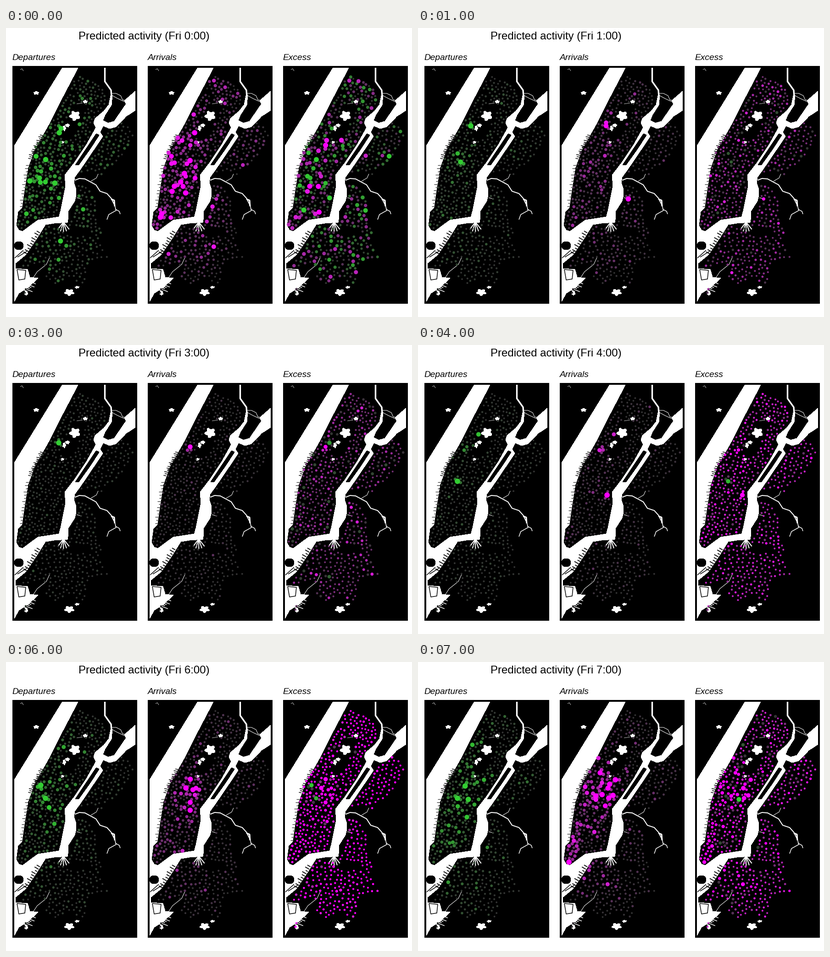
A matplotlib script for the animation above (8000 ms loop, 885 by 632 pixels).

```python
import numpy as np
import matplotlib.pyplot as plt
from matplotlib.animation import FuncAnimation
from matplotlib.path import Path

W, H, DPI = 885, 632, 100
PX = 72 / DPI
PANEL_STEP = 295
HOURS = 8
GREY = np.array([0.2, 0.2, 0.2])
GREEN = np.array([50, 205, 50]) / 255
MAGENTA = np.array([1.0, 0.0, 1.0])

fig = plt.figure(figsize=(W / DPI, H / DPI), dpi=DPI, facecolor="white")
ax = fig.add_axes([0, 0, 1, 1])
ax.set_xlim(0, W)
ax.set_ylim(H, 0)
ax.axis("off")

# ---------------------------------------------------------------- map

HARBOUR = [
    (123, 87), (157, 87), (124, 150), (92, 213), (62, 266), (48, 305),
    (41, 350), (35, 392), (26, 402), (22, 432), (28, 442), (36, 445),
    (56, 430), (70, 420), (116, 413), (136, 413), (134, 425), (105, 427),
    (86, 430), (66, 462), (44, 495), (21, 514), (21, 526), (47, 528),
    (52, 545), (70, 547), (47, 568), (28, 580), (18, 598), (18, 258)]
EAST_RIVER = [
    (228, 148), (224, 168), (213, 182), (194, 198), (191, 207), (196, 218),
    (176, 254), (148, 296), (128, 322), (130, 345), (119, 400), (115, 415),
    (136, 415), (136, 400), (150, 378), (153, 365), (152, 350), (148, 338),
    (150, 326), (163, 308), (186, 274), (211, 237), (205, 228), (212, 214),
    (226, 220), (240, 216), (262, 193), (282, 180), (282, 138), (258, 159),
    (262, 166), (236, 204), (222, 208), (211, 202), (216, 190), (230, 168),
    (232, 146)]
ISLAND = [(203, 234), (185, 262), (158, 300), (151, 300), (172, 268),
          (197, 231)]
# Ponds as x, y, half width, half height
PONDS = [(150, 192, 10, 9), (127, 219, 3, 5), (134, 213, 4, 3),
         (173, 161, 4, 3), (123, 250, 3, 2), (66, 142, 5, 3),
         (138, 578, 9, 6), (155, 567, 4, 2), (44, 580, 3, 4)]
# Streams as width followed by their bends
STREAMS = [
    (3.4, (215.5, 87), (215.5, 117), (229, 136), (230, 150)),
    (1, (231, 143), (240, 143), (250, 148), (254, 157), (266, 160)),
    (1, (232, 148), (243, 154), (258, 161)),
    (2, (150, 333), (160, 329), (172, 330), (196, 343), (205, 357),
     (220, 362), (229, 372), (237, 388)),
    (3, (229, 374), (236, 377), (237, 390)),
    (1.5, (237, 388), (240, 399), (224, 408), (220, 419)),
    (1.5, (238, 396), (247, 401), (249, 407)),
    (1, (185, 335), (197, 328), (201, 319)),
    (1, (154, 371), (165, 374)),
    (1, (60, 545), (68, 533), (88, 517), (95, 502)),
    (0.7, (154, 166), (167, 164)),
    (0.7, (31, 91), (35, 89), (38, 94))]


def stroke(points, width, color, dx):
    x, y = np.transpose(points)
    ax.plot(x + dx, y, color=color, lw=width * PX, solid_capstyle="butt",
            zorder=2)


def area(points, color, dx):
    x, y = np.transpose(points)
    ax.fill(x + dx, y, color=color, lw=0, antialiased=False, zorder=2)


def blob(x, y, rx, ry, color, dx, rough=0.0):
    turn = np.linspace(0, 2 * np.pi, 24)
    r = 1 + rough * np.sin(5 * turn + x)
    area(np.c_[x + rx * r * np.cos(turn), y + ry * r * np.sin(turn)],
         color, dx)


def piers(start, end, count, reach, width, color, dx):
    for i, t in enumerate(np.linspace(0, 1, count)):
        base = np.array(start) * (1 - t) + np.array(end) * t
        tip = base + np.array(reach) * (1 + 0.35 * np.sin(2.4 * i))
        stroke([base, tip], width, color, dx)


def draw_map(dx):
    area([(14, 83), (286, 83), (286, 603), (14, 603)], "black", dx)
    area(HARBOUR, "white", dx)
    area(EAST_RIVER, "white", dx)
    area(ISLAND, "black", dx)
    for pond in PONDS:
        blob(*pond, "white", dx, 0.25)
    for width, *bends in STREAMS:
        stroke(bends, width, "white", dx)
    piers((80, 235), (54, 286), 14, (-6, -1), 1.5, "black", dx)
    piers((49, 300), (36, 390), 14, (-6, 0), 1, "black", dx)
    piers((74, 448), (46, 494), 10, (-7, -4), 1.8, "black", dx)
    piers((48, 549), (36, 572), 8, (15, 6), 1.5, "white", dx)
    for a in np.radians(np.linspace(48, 130, 5)):
        stroke([(125, 424), (125 + 19 * np.cos(a), 424 + 22 * np.sin(a))],
               2, "white", dx)
    blob(28, 476, 10, 9, "black", dx)
    stroke([(25, 501), (46, 488)], 1.5, "black", dx)
    stroke([(19, 503), (38, 486)], 1.5, "black", dx)
    stroke([(24, 528), (43, 530), (41, 549), (28, 551), (24, 528)],
           1.5, "black", dx)


# ---------------------------------------------------------------- stations

MANHATTAN = [
    (160, 103), (205, 125), (220, 150), (221, 162), (186, 202), (184, 235),
    (152, 280), (124, 312), (124, 350), (110, 410), (62, 418), (36, 441),
    (26, 432), (25, 415), (41, 385), (46, 325), (60, 265), (96, 214),
    (143, 130), (152, 108)]
PARK = [(152, 156), (180, 170), (138, 250), (112, 238)]
QUEENS = [
    (252, 206), (266, 217), (277, 234), (258, 275), (208, 320), (175, 312),
    (160, 318), (190, 282), (222, 230)]
BROOKLYN = [
    (158, 345), (174, 347), (198, 375), (193, 410), (207, 445), (202, 470),
    (226, 508), (190, 505), (173, 520), (173, 561), (153, 561), (145, 540),
    (108, 561), (82, 540), (94, 520), (72, 516), (30, 522), (62, 484),
    (80, 445), (92, 432), (135, 442), (144, 408), (157, 378)]
YARD = [(122, 428), (185, 440), (180, 454), (126, 453)]


def fill_stations(rng, found, outline, gap, hole=None):
    outline = Path(outline)
    low, high = outline.vertices.min(0), outline.vertices.max(0)
    tries = rng.uniform(low, high, (7000, 2))
    keep = outline.contains_points(tries)
    if hole:
        keep &= ~Path(hole).contains_points(tries)
    for p in tries[keep]:
        if np.min(np.sum((np.array(found) - p) ** 2, axis=1)) > gap ** 2:
            found.append(p)


def place_stations():
    found = [(43, 571), (41, 579), (86, 298), (115, 214), (115, 207)]
    rng = np.random.default_rng(12)
    fill_stations(rng, found, MANHATTAN, 6.8, PARK)
    fill_stations(rng, found, QUEENS, 8.2)
    fill_stations(rng, found, BROOKLYN, 7.6, YARD)
    return np.array(found, float)


stations = place_stations()

# ---------------------------------------------------------------- activity

# Districts: x, y, spread x, spread y, then how strongly people leave and
# arrive late at night, and leave and arrive at dawn
DISTRICTS = np.array([
    (85, 330, 32, 50, .33, .36, .24, .24),
    (115, 275, 22, 28, .08, .14, .20, .42),
    (115, 205, 35, 45, .16, .18, .18, .08),
    (175, 140, 35, 30, .06, .11, .05, .03),
    (45, 415, 22, 22, .14, .24, .15, .34),
    (95, 480, 45, 35, .14, .19, .08, .10),
    (165, 395, 25, 28, .22, .20, .06, .05),
    (230, 270, 35, 30, .13, .13, .04, .04)])
# Small clusters that stand out in certain hours
PEAKS = {
    "dep": {1: [(115, 214), (88, 279)], 2: [(115, 211)], 3: [(115, 214)],
            4: [(101, 225), (131, 198), (86, 298)], 5: [(86, 298)],
            6: [(86, 298), (79, 271)], 7: [(86, 298)]},
    "arr": {1: [(115, 212), (164, 375)], 2: [(115, 210)], 3: [(104, 224)],
            4: [(103, 228), (130, 199), (117, 329)], 5: [(115, 276)],
            6: [(117, 276), (33, 395)], 7: [(120, 273), (33, 396)]}}
# Per hour: tone, spread, share of uneven stations, pull of flow, growth
EXCESS = [(.05, .28, .85, .9, 3.6), (-.3, .15, .8, .8, 2.6),
          (0, .55, .25, .5, 4.2), (-.3, .2, .6, 1, 3),
          (-.62, .15, .5, 1.7, 1.9), (-.85, .2, .7, 1.8, 1.8),
          (-1.3, .22, .8, 2.4, 1.2), (-.68, .15, .8, 1.6, 1.9)]


def bump(x, y, sx, sy):
    return np.exp(-((stations[:, 0] - x) / sx) ** 2 / 2
                  - ((stations[:, 1] - y) / sy) ** 2 / 2)


near = np.array([bump(*row[:4]) for row in DISTRICTS])


def flow(kind, hour):
    side = ["dep", "arr"].index(kind)
    rng = np.random.default_rng([hour, side])
    night = np.exp(-hour)
    dawn = max(0, (hour - 3) / 4) ** 1.5
    gain = DISTRICTS[:, 4 + side] * night + DISTRICTS[:, 6 + side] * dawn
    mean = 0.02 + 0.02 * dawn + 0.02 * night + gain @ near
    v = mean * rng.gamma(1.3, 1 / 1.3, len(stations))
    for x, y in PEAKS[kind].get(hour, []):
        v += bump(x, y, 4.5, 4.5) * rng.uniform(0.8, 1.1, len(stations))
    return np.clip(v, 0, 1)


def excess(hour, dep, arr):
    tone, spread, share, pull, growth = EXCESS[hour]
    rng = np.random.default_rng([hour, 2])
    n = len(stations)
    shift = spread * rng.normal(size=n) * (rng.random(n) < share)
    shift += pull * (dep - arr)
    return np.minimum(2 + growth * np.abs(shift), 5.6), tone + shift


def radius(v):
    return 1.9 + 4 * v ** 0.9


def blend(tone):
    """Muted grey through to green (positive) or magenta (negative)."""
    tone = np.clip(tone, -1, 1)[:, None]
    t = np.abs(tone) ** 1.5
    end = np.where(tone < 0, MAGENTA, GREEN)
    return np.sqrt((1 - t) * GREY ** 2 + t * end ** 2)


# ---------------------------------------------------------------- stage

def label(x, y, text, size, **style):
    return ax.text(x, y, text, fontsize=size * PX, family="Liberation Sans",
                   color="black", va="baseline", ha="left", **style)


title = label(157.5, 25, "", 24)
dots = []
for k, name in enumerate(["Departures", "Arrivals", "Excess"]):
    draw_map(k * PANEL_STEP)
    label(13.5 + k * PANEL_STEP, 70, name, 19.2, style="italic")
    dots.append(ax.scatter([], [], linewidths=0, zorder=3))


def update(hour):
    title.set_text(f"Predicted activity (Fri {hour}:00)")
    dep, arr = flow("dep", hour), flow("arr", hour)
    looks = [(radius(dep), 1.2 * dep), (radius(arr), -1.2 * arr),
             excess(hour, dep, arr)]
    for k, (r, tone) in enumerate(looks):
        order = np.argsort(r)
        dots[k].set_offsets(stations[order] + (k * PANEL_STEP, 0))
        dots[k].set_sizes((2 * r[order] * PX) ** 2)
        dots[k].set_facecolors(blend(tone[order]))
    return [title, *dots]


anim = FuncAnimation(fig, update, frames=HOURS, interval=1000, repeat=True,
                     init_func=lambda: update(0), blit=False)
plt.show()
```
